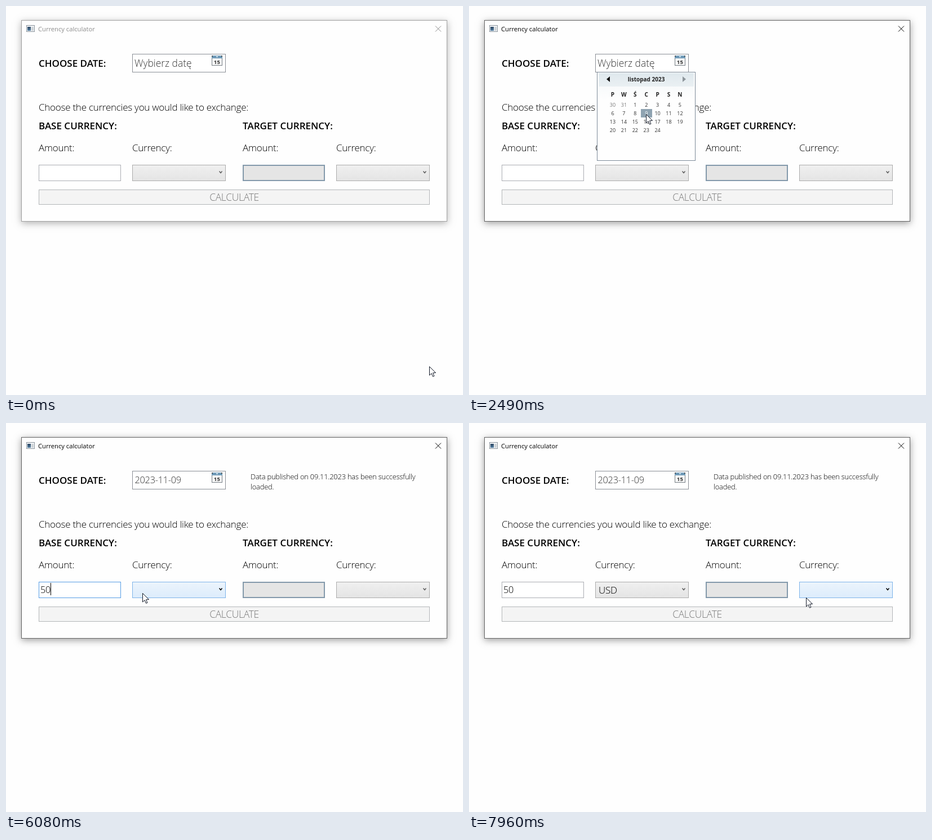
Animation of 811x691 px, one loop 8000 ms. Source, as an HTML page with a canvas:

```html
<!DOCTYPE html>
<html lang="en">
<head>
<meta charset="utf-8">
<title>Currency calculator</title>
<style>
html, body { margin: 0; width: 100%; height: 100%; overflow: hidden; background: #fefefe; }
canvas { display: block; }
</style>
</head>
<body>
<canvas id="stage" width="811" height="691"></canvas>
<script>
const ctx = document.getElementById('stage').getContext('2d');
const LOOP = 8000, INK = '#000';
const ACTIVATE = 470, CALENDAR_OPEN = 1200, PICK = 2490, CALENDAR_CLOSE = 2630, LOADED = 3300,
  FOCUS = 4650, TYPE_5 = 5390, TYPE_0 = 5600, LIST_OPEN = 6330, LIST_CLOSE = 7130;
const CURRENCIES = 'THB USD AUD HKD CAD NZD SGD EUR HUF CHF GBP UAH JPY'.split(' ');

// Pointer path: time, x, y
const PATH = [
  [0, 751, 640], [65, 751, 640], [130, 435, 121], [330, 435, 121], [1000, 374, 98], [1200, 374, 98],
  [1450, 400, 205], [1660, 464, 280], [1940, 299, 186], [2220, 314, 192], [2630, 314, 192],
  [2960, 377, 156], [3160, 377, 156], [3510, 477, 117], [3800, 510, 93], [4000, 510, 100],
  [4350, 215, 320], [4600, 141, 298], [4780, 141, 298], [4850, 145, 300], [5600, 145, 300],
  [5940, 190, 294], [6080, 242, 302], [6330, 262, 301], [6770, 277, 381], [7000, 285, 353],
  [7130, 285, 353], [7610, 416, 325], [7680, 425, 327], [7960, 598, 310], [8000, 598, 310]
];

function pointerAt(t) {
  const i = PATH.findIndex(p => p[0] > t);
  const [t0, x0, y0] = PATH[i - 1], [t1, x1, y1] = PATH[i];
  const k = (t - t0) / (t1 - t0);
  return { x: Math.round(x0 + (x1 - x0) * k), y: Math.round(y0 + (y1 - y0) * k) };
}

function text(str, x, y, { size = 17, weight = 300, color = INK, align = 'left', track = -0.25 } = {}) {
  ctx.font = `${weight} ${size}px "Open Sans", "Noto Sans", sans-serif`;
  ctx.letterSpacing = track + 'px';
  ctx.textAlign = align;
  ctx.fillStyle = color;
  ctx.fillText(str, x, y);
}

function box(x, y, w, h, fill, stroke, line = 1) {
  ctx.fillStyle = fill;
  ctx.fillRect(x, y, w, h);
  if (!stroke) return;
  ctx.strokeStyle = stroke;
  ctx.lineWidth = line;
  ctx.strokeRect(x + line / 2, y + line / 2, w - line, h - line);
}

function shape(points, { fill, stroke, line = 1, close = false }) {
  ctx.beginPath();
  points.forEach(([x, y]) => ctx.lineTo(x, y));
  if (close) ctx.closePath();
  if (fill) { ctx.fillStyle = fill; ctx.fill(); }
  if (stroke) { ctx.strokeStyle = stroke; ctx.lineWidth = line; ctx.stroke(); }
}

function shadowed(blur, dx, dy, alpha, draw) {
  ctx.save();
  ctx.shadowColor = `rgba(0,0,0,${alpha})`;
  ctx.shadowBlur = blur;
  ctx.shadowOffsetX = dx;
  ctx.shadowOffsetY = dy;
  draw();
  ctx.restore();
}

function vertical(y0, y1, from, to) {
  const g = ctx.createLinearGradient(0, y0, 0, y1);
  g.addColorStop(0, from);
  g.addColorStop(1, to);
  return g;
}

const inside = (p, x, y, w, h) => p.x >= x && p.x < x + w && p.y >= y && p.y < y + h;
const overAmount = p => inside(p, 58, 282, 146, 29);

function drawWindow(active) {
  shadowed(12, 0, 3, active ? 0.38 : 0.3, () => box(27, 25, 756, 358, '#fefefe'));
  box(27, 25, 756, 358, '#fefefe', active ? '#626262' : '#a0a0a0');
  box(36, 34, 15, 12, '#f4f6f8', '#8b949c');
  box(38, 37, 6, 7, vertical(37, 44, '#27425f', '#5b86a8'));
  box(45, 37, 4, 7, '#cfd4d8');
  const color = active ? '#000' : '#8c8c8c';
  text('Currency calculator', 57, 45, { size: 11.2, weight: 400, color, track: 0 });
  shape([[762, 35.5], [772, 45.5]], { stroke: color });
  shape([[772, 35.5], [762, 45.5]], { stroke: color });
}

function drawDatePicker(t) {
  box(224, 85, 166, 33, '#fff', '#8a8f96');
  if (t < CALENDAR_CLOSE) {
    text('Wybierz datę', 228, 108, { size: 17.4, color: '#333', track: 0 });
  } else {
    if (t < FOCUS) box(229, 89, 81, 22, '#99c9ef');
    text('2023-11-09', 228.5, 107, { size: 16.3, color: '#333' });
  }
  box(365, 88, 19, 18, '#f6f6f6', '#777f86');
  box(365, 88, 19, 5, '#6f9ab8');
  box(365, 88, 2, 2, '#555');
  box(382, 88, 2, 2, '#555');
  box(373, 89, 3, 2, '#d5e4ee');
  text('15', 374.5, 103, { size: 9.5, weight: 700, color: '#333', align: 'center', track: 0.3 });
}

function drawCombo(x, p, value) {
  const hover = inside(p, x, 282, 166, 29);
  const fill = hover ? vertical(282, 311, '#ecf4fc', '#dcecfc') : vertical(282, 311, '#f0f0f0', '#e4e4e4');
  box(x, 282, 166, 29, fill, hover ? '#7eb4ea' : '#acacac');
  shape([[x + 154.5, 293.5], [x + 157, 296.5], [x + 159.5, 293.5]],
    { stroke: hover ? '#000' : '#606060', line: 1.5 });
  if (value) text(value, x + 6, 303);
}

function drawAmount(t, p) {
  const focused = t >= FOCUS && t < LIST_OPEN;
  box(58, 282, 146, 29, '#fff', focused ? '#569de5' : overAmount(p) ? '#7eb4ea' : '#abadb3');
  const value = t < TYPE_5 ? '' : t < TYPE_0 ? '5' : '50';
  text(value, 61, 302, { size: 16.3 });
  const sinceInput = t - (t < TYPE_5 ? FOCUS : t < TYPE_0 ? TYPE_5 : TYPE_0);
  if (focused && sinceInput % 1060 < 530) {
    box(61 + Math.round(ctx.measureText(value).width), 284, 1, 22, '#000');
  }
}

function drawForm(t, p) {
  const bold = { weight: 600, track: 0 };
  text('CHOOSE DATE:', 58, 108, bold);
  drawDatePicker(t);
  if (t >= LOADED) {
    const small = { size: 12.9, track: -0.2 };
    text('Data published on 09.11.2023 has been successfully', 434, 100, small);
    text('loaded.', 434, 118, small);
  }
  text('Choose the currencies you would like to exchange:', 58, 186);
  [['BASE CURRENCY:', 58], ['TARGET CURRENCY:', 420]].forEach(([title, x]) => {
    text(title, x, 219, bold);
    text('Amount:', x, 258);
    text('Currency:', x + 166, 258);
  });
  drawAmount(t, p);
  drawCombo(224, p, t >= LIST_CLOSE && 'USD');
  box(420, 282, 146, 29, '#e5e5e5', '#8399ab', 2);
  drawCombo(586, p);
  box(58, 326, 694, 27, '#f4f4f4', '#b3b6b8');
  text('CALCULATE', 405, 346, { size: 17.4, color: '#777', align: 'center' });
}

function drawCalendar(t, p) {
  box(227, 117, 175, 158, '#fefefe', '#7d8b99');
  box(230, 119, 169, 24, vertical(119, 143, '#dfe8ed', '#eaf0f3'));
  box(230, 143, 169, 24, vertical(143, 167, '#f8fafb', '#fefefe'));
  shape([[244, 130], [250, 125], [250, 135]], { fill: '#111' });
  shape([[385, 130], [379, 125], [379, 135]], { fill: '#8d959b' });
  text('listopad 2023', 314.5, 134, { size: 10, weight: 700, color: '#222', align: 'center', track: 0 });
  const column = c => 255 + 19.9 * c;
  [...'PWŚCPSN'].forEach((day, c) =>
    text(day, column(c), 160.5, { size: 10, weight: 700, color: '#222', align: 'center', track: 0 }));
  for (let i = 0; i < 26; i++) {
    const day = i < 2 ? 30 + i : i - 1;
    const x = column(i % 7), y = 175.7 + 15 * Math.floor(i / 7);
    const selected = day === (t < PICK ? 24 : 9);
    const hover = inside(p, x - 10, y - 7.5, 20, 15);
    if (selected) box(Math.round(x - 10), Math.round(y - 8), 20, 15, '#8fa3b1');
    else if (hover) box(Math.round(x - 10), Math.round(y - 8), 20, 15, '#dceef4');
    text(day, x, y + 3.3, { size: 9, weight: 400, align: 'center', track: 0,
      color: selected ? '#fff' : i < 2 ? '#777' : '#333' });
  }
}

function drawList(p) {
  shadowed(4, 2, 2, 0.6, () => box(224, 311, 166, 353, '#fff'));
  box(224, 311, 166, 353, '#fff', '#707070');
  ctx.save();
  ctx.beginPath();
  ctx.rect(225, 312, 164, 351);
  ctx.clip();
  CURRENCIES.forEach((code, i) => {
    const top = 312.4 + 27.4 * i;
    if (inside(p, 225, top, 148, 27.4)) box(225, Math.round(top), 148, 28, '#b9dff0', '#3ba6dc');
    text(code, 230, top + 20.6);
  });
  box(373, 312, 16, 351, '#f0f0f0');
  box(373, 329, 16, 115, '#cdcdcd');
  shape([[377, 323], [381, 319], [385, 323]], { stroke: '#888' });
  shape([[377, 653], [381, 657], [385, 653]], { stroke: '#888' });
  ctx.restore();
}

function drawPointer(p) {
  ctx.save();
  ctx.translate(p.x + 0.5, p.y + 0.5);
  if (overAmount(p)) {
    shape([[0, -7], [0, 7]], { stroke: '#000' });
    [-7, 7].forEach(y => shape([[-3, y], [3, y]], { stroke: '#000' }));
  } else {
    shape([[0, 0], [0, 15.5], [3.6, 12.2], [6, 17.8], [8.4, 16.8], [6.1, 11.3], [11, 11]],
      { fill: '#fff', stroke: '#111827', close: true });
  }
  ctx.restore();
}

function render(now) {
  const t = now % LOOP, p = pointerAt(t);
  ctx.fillStyle = '#fefefe';
  ctx.fillRect(0, 0, 811, 691);
  drawWindow(t >= ACTIVATE);
  drawForm(t, p);
  if (t >= CALENDAR_OPEN && t < CALENDAR_CLOSE) drawCalendar(t, p);
  if (t >= LIST_OPEN && t < LIST_CLOSE) drawList(p);
  drawPointer(p);
}

const start = performance.now();
function tick() {
  render(performance.now() - start);
  requestAnimationFrame(tick);
}
tick();
</script>
</body>
</html>
```
